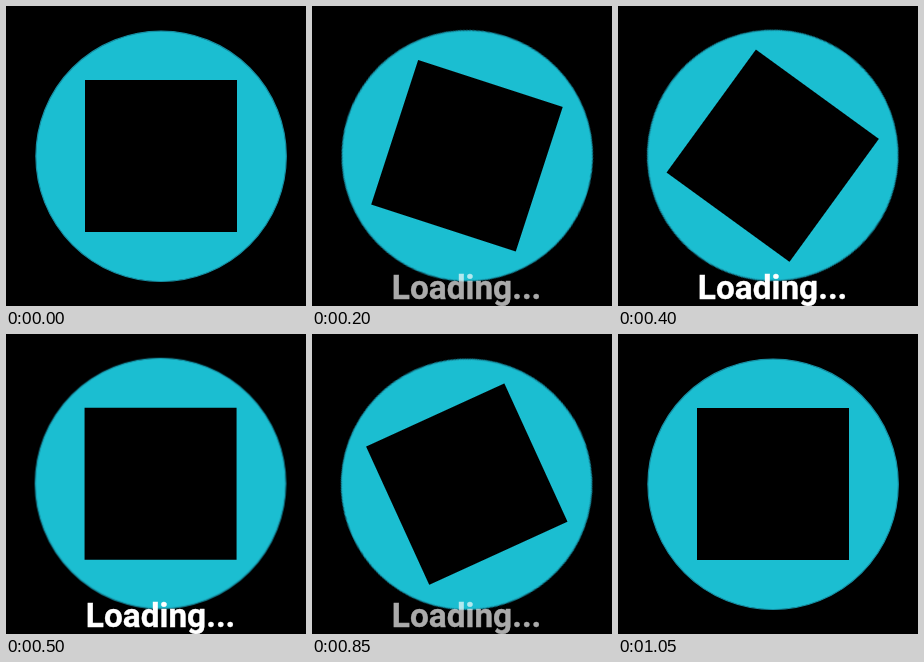
These frames come from a looping animation (300 px wide and 300 px high, 1100 ms). An HTML page:

```html
<!DOCTYPE html>
<html lang="en">
<head>
<meta charset="utf-8">
<title>Loading</title>
<style>
  html, body {
    margin: 0;
    width: 100%;
    height: 100%;
    overflow: hidden;
    background: #000;
  }
  svg {
    display: block;
    width: 100%;
    height: 100%;
  }
  .badge {
    transform-origin: 154.8px 149.9px;
    animation: turn 1100ms infinite;
  }
  .disc {
    fill: #1bbed1;
    stroke: #168fa3;
    stroke-width: 1.2;
  }
  .label {
    font: 700 33.4px Roboto, sans-serif;
    text-anchor: middle;
    fill: #fff;
    stroke: #fff;
    stroke-width: 0.4;
    animation: fade 1100ms infinite;
  }
  /* Two half turns, the second one slightly slower, in 50 ms ticks */
  @keyframes turn {
    0% { transform: rotate(0deg); animation-timing-function: steps(10); }
    45.454% { transform: rotate(-180deg); animation-timing-function: steps(11); }
    95.454%, 100% { transform: rotate(-360deg); }
  }
  @keyframes fade {
    0% { opacity: 0; animation-timing-function: steps(6); }
    27.272% { opacity: 1; }
    68.181% { opacity: 1; animation-timing-function: steps(6); }
    95.454%, 100% { opacity: 0; }
  }
</style>
</head>
<body>
<svg viewBox="0 0 300 300">
  <g class="badge">
    <circle class="disc" cx="155.1" cy="150.3" r="125.2"/>
    <rect x="79" y="74" width="152" height="152"/>
  </g>
  <text class="label" x="154.6" y="293">Loading...</text>
</svg>
</body>
</html>
```
